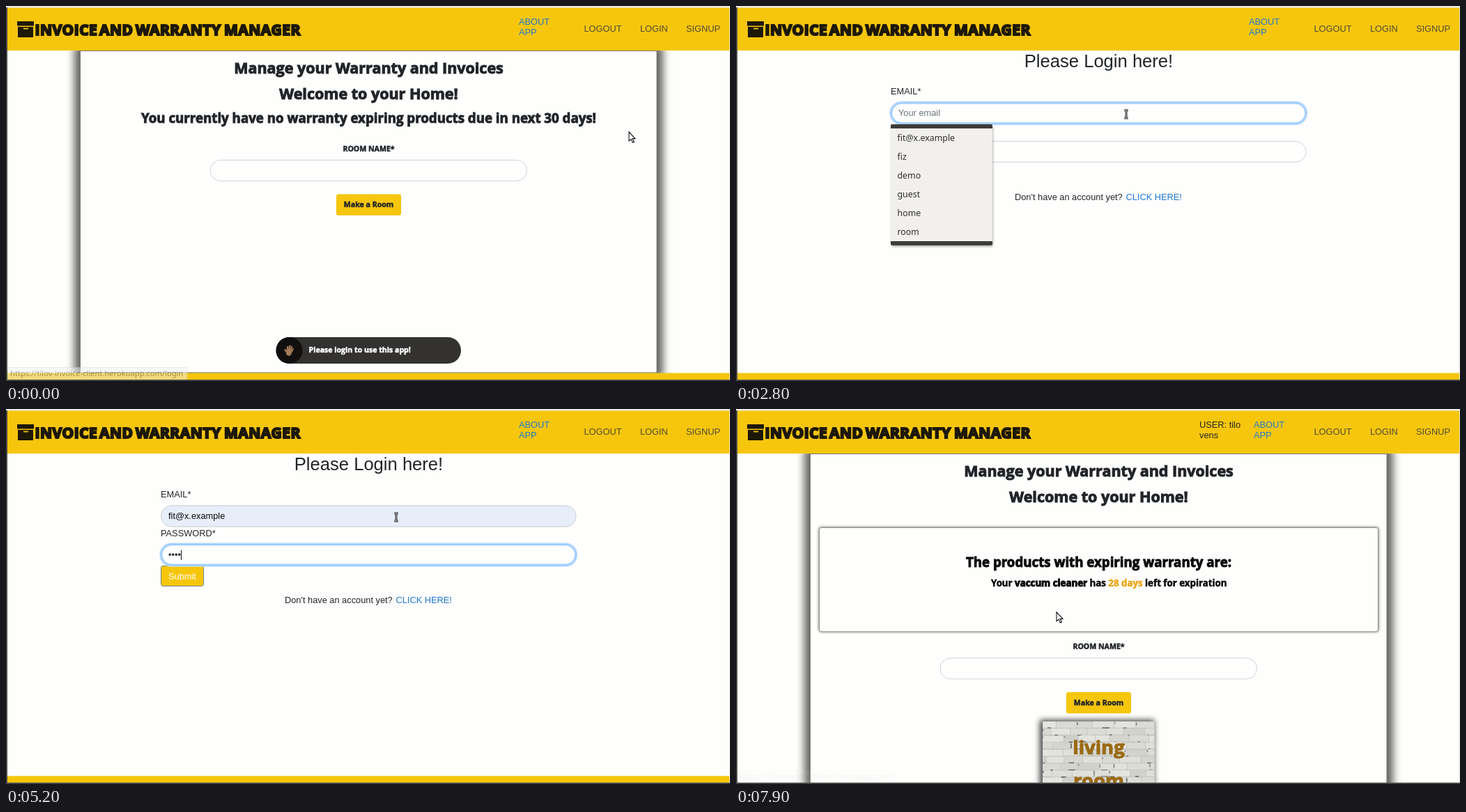
Animation of 1039 by 539 pixels, one loop 8 s. Source, as an HTML page:

```html
<!DOCTYPE html>
<html lang="en">
<head>
<meta charset="utf-8">
<title>Invoice and Warranty Manager</title>
<style>
  html, body { margin: 0; width: 100%; height: 100%; overflow: hidden; background: #fefefd; }
  svg { display: block; width: 1039px; height: 539px; }
  text { font: 12.8px "Liberation Sans", Arial, sans-serif; fill: #212529; white-space: pre; }
  .mid { text-anchor: middle; }
  .big { font-size: 25.6px; }
  .link { fill: #1f78d1; }
  .nav { fill: #4f4b38; }
  .hint { fill: #6c757d; }
  .heavy { font-family: "Open Sans", "Noto Sans", sans-serif; font-weight: 700; color: #212529;
    fill: currentColor; stroke: currentColor; stroke-width: .5px; }
  .h1 { font-size: 21.5px; stroke-width: 1px; }
  .h2 { font-size: 18.7px; stroke-width: .9px; }
  .h3 { font-size: 13.3px; }
  .label { font-size: 10.6px; }
  .brand { font-size: 21px; color: #1d1808; stroke-width: 2.2px; letter-spacing: .5px; }
  .room { font-size: 27.5px; color: #9a6a12; stroke-width: 1px; }
  .white { color: #fff; fill: #fff; }
  .ink { color: #0a0a0a; fill: #0a0a0a; }
  .preview { font-size: 10.05px; }
  .strong { stroke-width: 1px; }
  .days { fill: #eda512; stroke: #eda512; }
  .ui { font-family: "Noto Sans", "Open Sans", sans-serif; font-size: 12.4px; fill: #2f2e2b; }
  .status { font-size: 11.15px; fill: #5a5957; }
  .field { fill: #fefefd; stroke: #d0d3d6; }
  .filled { fill: #e7eefa; }
  .ring { fill: none; stroke: #bfdeff; stroke-width: 4.5px; }
  .focus { fill: none; stroke: #80bdff; }
  .caret { stroke: #111; stroke-width: 1px; }
  .yellow { fill: #f6c60d; }
  .dark { fill: #4a4a48; }
</style>
</head>
<body>
<svg id="stage" viewBox="0 0 1039 539" xmlns="http://www.w3.org/2000/svg"></svg>
<script>
const LOOP = 8000, STEP = 100;
const stage = document.getElementById('stage');

const text = (x, y, cls, str) => `<text x="${x}" y="${y}" class="${cls}">${str}</text>`;
const rect = (x, y, w, h, attrs = '') =>
  `<rect x="${x}" y="${y}" width="${w}" height="${h}" ${attrs}/>`;
// "when" is a list of start-end spans in ms
const during = (when, body) => `<g data-when="${when}">${body}</g>`;

const field = (x, y, w, cls = 'field') => rect(x, y, w, 30, `rx="15" class="${cls}"`);
const focus = y => field(222.5, y, 595.5, 'ring') + field(222.5, y, 595.5, 'focus');
const caret = (x, y) => `<path class="caret" d="M${x} ${y}v14"/>`;

function dropdown(y, items, hot) {
  const row = 27, h = items.length * row + 12;
  return rect(223, y + 2, 146, h, 'rx="3" opacity=".3" style="filter:blur(1.5px)"') +
    rect(222, y, 146, h, 'rx="2" fill="#3d3c38"') +
    rect(222, y + 6, 146, h - 12, 'fill="#f1f0ed"') +
    items.map((item, i) =>
      (item === hot ? rect(222, y + 6 + i * row, 146, row, 'fill="#e06f45"') : '') +
      text(231.5, y + 24 + i * row, 'ui', item)).join('');
}

function bricks(x, y, w, h) {
  let seed = 7, out = rect(x, y, w, h, 'fill="#c9c8c2"');
  const rnd = () => (seed = seed * 16807 % 2147483647) / 2147483647;
  for (let r = 0; r * 10 < h; r++) {
    for (let bx = r % 2 ? -14 : 0; bx < w;) {
      const bw = 20 + rnd() * 12, left = Math.max(bx, 0);
      const tone = 208 + rnd() * 22 | 0, width = Math.max(Math.min(bx + bw, w) - left - 1, 0);
      const top = y + r * 10 + rnd();
      out += rect(x + left, top, width, 8.6, `rx="1.5" fill="rgb(${tone},${tone},${tone - 5})"`);
      // worn joints and chips
      if (rnd() < .6) out += rect(x + left + width * rnd() / 2, top + 8.4, width * rnd() / 2, 1 + rnd(), 'fill="#6a6760"');
      if (rnd() < .4) out += rect(x + left, top + 1, 1 + rnd(), 7 * rnd(), 'fill="#77746c"');
      bx += bw;
    }
  }
  return out;
}

const panel = h =>
  rect(98, 55, 845, h + 18, 'rx="8" fill="#63635e" style="filter:blur(6px)"') +
  rect(106.5, 64.5, 827.5, h, 'fill="#fefefd" stroke="#77776f"');
const heading =
  text(520.5, 96.5, 'heavy h1 mid', 'Manage your Warranty and Invoices') +
  text(520.5, 133.5, 'heavy h1 mid', 'Welcome to your Home!');
const roomForm =
  text(520.5, 208.8, 'heavy label mid', 'ROOM NAME*') +
  field(293, 221.5, 454.5) +
  rect(474, 270.5, 93, 30.5, 'rx="3" class="yellow"') +
  text(520.5, 289, 'heavy label mid', 'Make a Room');
const noneDue = text(520.5, 167.5, 'heavy h2 mid',
  'You currently have no warranty expiring products due in next 30 days!');

const toast =
  rect(387.5, 476, 265.5, 38, 'rx="19" fill="#333230"') +
  '<circle cx="406.5" cy="495" r="19" fill="#11100f"/>' +
  `<g transform="translate(406.5 495.5) rotate(14)" stroke="#a67c58" stroke-width="2.2" stroke-linecap="round">
    <path d="M-3 0L-3.6-5M-.8-1L-.9-7M1.5-1L1.9-6.4M3.6 0L4.6-4M-3 3L-6.2.2"/>
    <path d="M-3-1H3.4V3Q3 6.5 0 6.5T-3 3Z" fill="#a67c58" stroke-width="1.4"/></g>` +
  text(434.5, 498, 'heavy label white', 'Please login to use this app!');

const dueCard =
  rect(119, 170, 803, 150, 'rx="3" opacity=".6" style="filter:blur(2px)"') +
  rect(119.5, 170.5, 802, 149.5, 'rx="3" fill="#fefefd" stroke="#8a8a85"') +
  text(520.5, 226.5, 'heavy h2 mid ink', 'The products with expiring warranty are:') +
  text(366, 254.8, 'heavy h3 ink',
    'Your <tspan class="strong">vaccum cleaner</tspan> has ' +
    '<tspan class="days">28 days</tspan> left for expiration');
const roomCard =
  rect(436, 447, 164, 110, 'opacity=".75" style="filter:blur(4px)"') +
  bricks(440, 449, 161, 90) +
  text(520.5, 496, 'heavy room mid', 'living') +
  text(520.5, 543.5, 'heavy room mid', 'room');

const mail = 'fit@x.example', shortName = 'fiz';
const login =
  text(520.5, 88, 'big mid', 'Please Login here!') +
  text(222, 126.6, '', 'EMAIL*') + text(222, 182.6, '', 'PASSWORD*') +
  field(222.5, 139, 595.5) + field(222.5, 194.5, 595.5) +
  rect(222.5, 225.5, 61, 29, 'rx="3" class="yellow" stroke="#6b8487"') +
  text(233, 244.6, 'white', 'Submit') +
  text(400, 279, '', "Don't have an account yet?") + text(559.5, 279, 'link', 'CLICK HERE!') +
  during('3300-6000', field(222.5, 139, 595.5, 'field filled')) +
  during('2300-3700', focus(139)) +
  during('3700-6000', focus(194.5)) +
  during('1400-3000', text(233, 158, 'hint', 'Your email')) +
  during('2300-2800', caret(233.5, 147)) +
  during('3000-3300', text(233, 158, '', mail.slice(0, 2)) + caret(240.5, 147)) +
  during('3300-3600', text(233, 158, 'preview', mail)) +
  during('3600-6000', text(233, 158, 'ink', mail)) +
  during('1400-4500', text(233, 214, 'hint', 'Password')) +
  during('3800-4200', caret(233.5, 203)) +
  [4500, 4600, 4800, 5000].map((t, i, all) =>
    during(`${t}-${all[i + 1] || 6000}`, text(233, 214, '', '•'.repeat(i + 1))) +
    during(`${t}-${all[i + 1] || 5600}`, caret(238 + i * 4.5, 203))).join('') +
  during('2300-3000', dropdown(170, [mail, shortName, 'demo', 'guest', 'home', 'room'])) +
  during('3000-3300', dropdown(170, [mail, shortName])) +
  during('3300-3600', dropdown(170, [mail, shortName], mail)) +
  during('4500-4600', dropdown(226, [mail, shortName, 'demo', 'guest'])) +
  during('4600-5100', dropdown(226, [mail]));

const welcome =
  text(520.5, 248, 'big mid', 'Welcome, You are now Logged in!') +
  text(520.5, 273.6, 'link mid', 'GO TO HOME') +
  during('6800-7300', '<path d="M479 275.5h83" stroke="#1f78d1"/>');

const about = x => text(x, 26.8, 'link', 'ABOUT') + text(x, 42, 'link', 'APP');
const nav =
  rect(2, 2, 1036, 62, 'class="yellow"') +
  '<path d="M16 22h24v6.5H16zM17 30h22v15H17z" fill="#1d1808"/>' +
  '<path d="M25 32.5h7" stroke="#f6c60d" stroke-width="1.8"/>' +
  text(41.5, 42.2, 'heavy brand', 'INVOICE') + text(134, 42.2, 'heavy brand', 'AND') +
  text(186, 42.2, 'heavy brand', 'WARRANTY') + text(313, 42.2, 'heavy brand', 'MANAGER') +
  during('0-6000', about(736)) +
  during('6000-8000', about(743) + text(665, 26.8, '', 'USER: tilo') + text(665, 42, '', 'vens')) +
  text(829.5, 37.4, 'nav', 'LOGOUT') + text(976, 37.4, 'nav', 'SIGNUP') +
  text(910, 37.4, 'nav', 'LOGIN') +
  during('700-1500', '<path d="M910 39h40" stroke="#2c4256"/>');

const site = 'https://tilov-invoice-client.herokuapp.com/';
const status = (w, url) =>
  rect(2, 519.5, w, 18, 'rx="2" fill="#f2f1ef" stroke="#d3d2cd"') + text(6, 532, 'ui status', url);

const frame =
  rect(0, 0, 1039, 2.5, 'fill="#ebebe9"') + rect(1038, 2, 1, 535, 'fill="#deded8"') +
  rect(0, 2, 2, 537, 'class="dark"') + rect(0, 537, 1039, 2, 'class="dark"');

const beam = 'M-2.6-5.5H2.6M0-5.5V5.5M-2.6 5.5H2.6';
const cursor =
  during('0-600 1500-1800 6000-6800 7400-8000',
    '<path d="M0 0V13L3 10.3 5.3 15.3 7.4 14.4 5.2 9.6H9Z" fill="#fff" stroke="#111" stroke-width="1.1"/>') +
  during('600-1500 6800-7400',
    '<path d="M-1.5 8V1.2Q-1.5 0-.3 0T1 1.2V5L5 6Q6.3 6.3 6 8L5.3 11V13H-.5L-4.6 8.6Q-5 7-3.4 7Z" fill="#fff" stroke="#111" stroke-width="1.2"/>') +
  during('1800-6000',
    `<path d="${beam}" stroke="#111" stroke-width="2.8"/><path d="${beam}" stroke="#fff" stroke-width=".8"/>`);

stage.innerHTML =
  rect(0, 0, 1039, 539, 'fill="#fefefd"') +
  during('0-1400 7300-7400', panel(462.5) + heading + noneDue + roomForm) +
  during('0-1400', toast) +
  during('1400-6000', login) +
  during('6000-7300', welcome) +
  during('7400-8000', panel(560) + heading + dueCard +
    `<g transform="translate(0 136.5)">${roomForm}</g>` + roomCard) +
  during('0-6000 7300-7400', rect(2, 527.5, 1036, 10, 'class="yellow"')) +
  nav +
  `<g id="status">${during('0-6000', status(258, site + 'login'))}${during('6000-8000', status(226, site))}</g>` +
  frame + `<g id="cursor">${cursor}</g>`;

// time, x, y
const path = [
  [0, 894, 181], [300, 894, 181], [700, 945, 30], [1400, 945, 30], [1600, 720, 136],
  [1700, 720, 136], [1900, 560, 155.5], [5900, 560, 155.5], [6200, 503, 298],
  [6300, 503, 298], [6500, 514, 258], [6700, 514, 258], [6900, 517, 263],
  [7300, 517, 263], [7800, 460, 292], [8000, 460, 292]
];
// time, opacity
const fades = [[0, .5], [100, 0], [600, .5], [700, 1], [1800, .5], [1900, 0],
  [6800, .5], [6900, 1], [7600, .6], [7700, .4], [7800, .2], [7900, .06]];

const parts = [...stage.querySelectorAll('[data-when]')].map(el => ({
  el, spans: el.dataset.when.split(' ').map(s => s.split('-').map(Number))
}));
const pointer = document.getElementById('cursor');
const bar = document.getElementById('status');

function draw(t) {
  for (const { el, spans } of parts)
    el.style.display = spans.some(([a, b]) => t >= a && t < b) ? '' : 'none';
  const i = path.findIndex(k => k[0] > t);
  const [t0, x0, y0] = path[i - 1], [t1, x1, y1] = path[i];
  const p = (t - t0) / (t1 - t0);
  pointer.setAttribute('transform', `translate(${x0 + (x1 - x0) * p} ${y0 + (y1 - y0) * p})`);
  bar.style.opacity = fades.filter(f => f[0] <= t).pop()[1];
}

const start = performance.now();
function tick() {
  const t = (performance.now() - start) % LOOP;
  draw(Math.floor(t / STEP) * STEP);
  requestAnimationFrame(tick);
}
tick();
</script>
</body>
</html>
```
